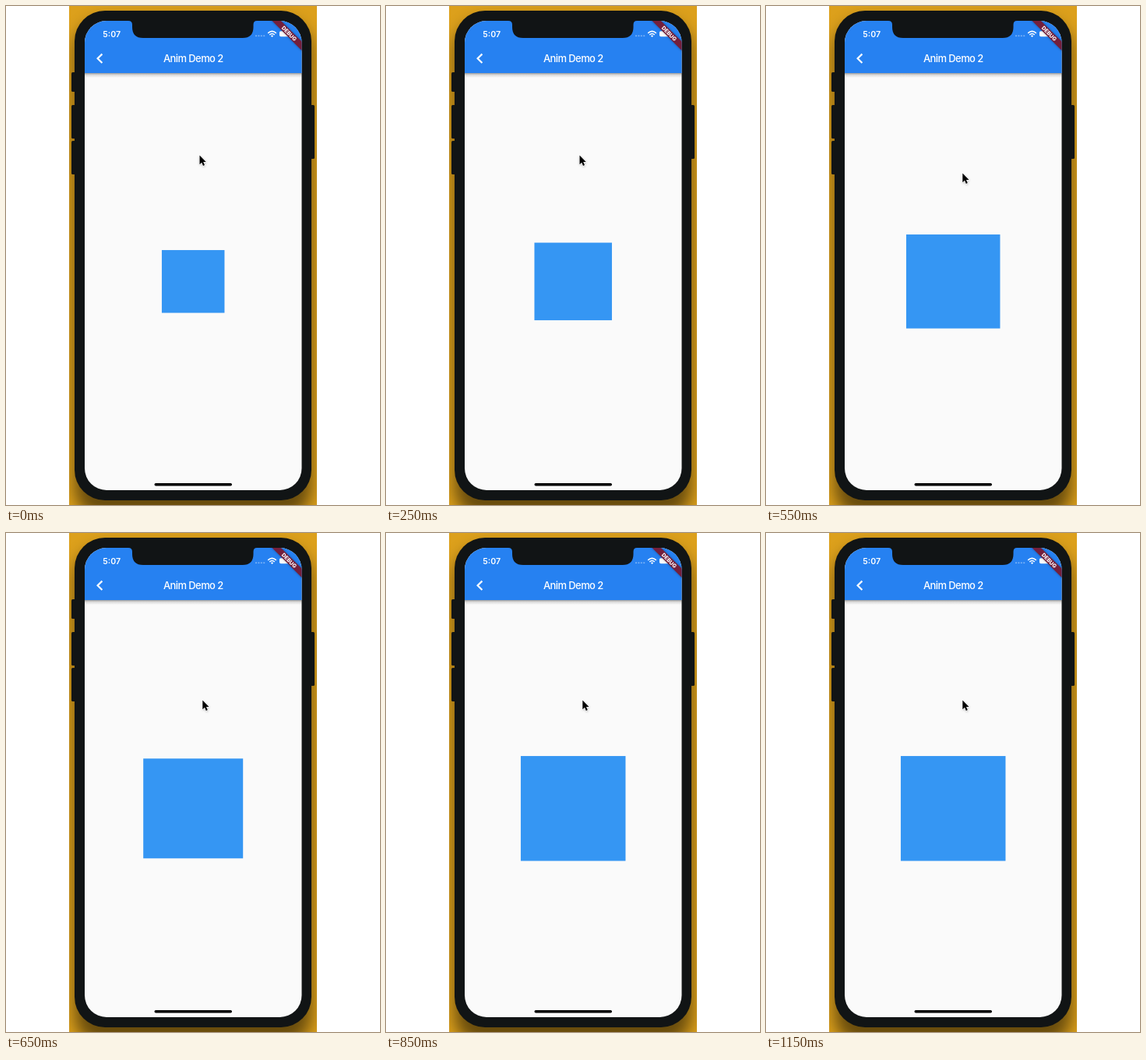
Animation, 480 px wide and 640 px high, one loop 1.2 s. Source, as an HTML page:

```html
<!DOCTYPE html>
<html lang="en">
<head>
<meta charset="utf-8">
<title>Anim Demo 2</title>
<style>
  html, body { margin: 0; width: 100%; height: 100%; overflow: hidden; background: #fff; }
  svg { display: block; width: 480px; height: 640px; }
  text { font-family: Inter, Roboto, sans-serif; fill: #fff; }
</style>
</head>
<body>
<svg viewBox="0 0 480 640">
  <defs>
    <clipPath id="desk"><rect x="81" width="318" height="640"/></clipPath>
    <clipPath id="screen"><rect x="101" y="19" width="278.5" height="602" rx="28"/></clipPath>
    <filter id="soft" x="-20%" y="-20%" width="140%" height="140%"><feGaussianBlur stdDeviation="10"/></filter>
    <filter id="glow" x="-50%" y="-50%" width="200%" height="200%"><feGaussianBlur stdDeviation="1.6"/></filter>
    <linearGradient id="barShadow" x2="0" y2="1">
      <stop offset="0" stop-color="#000" stop-opacity=".38"/>
      <stop offset=".4" stop-color="#000" stop-opacity=".13"/>
      <stop offset="1" stop-color="#000" stop-opacity="0"/>
    </linearGradient>
  </defs>

  <g clip-path="url(#desk)">
    <rect x="81" width="318" height="640" fill="#dca01c"/>
    <rect x="88" y="18" width="304" height="640" rx="40" opacity=".52" filter="url(#soft)"/>
  </g>

  <!-- phone body and side buttons -->
  <g fill="#111415">
    <rect x="84" y="85" width="8" height="25" rx="1.5"/>
    <rect x="84" y="127" width="8" height="43" rx="1.5"/>
    <rect x="84" y="173" width="8" height="43" rx="1.5"/>
    <rect x="388" y="127" width="8" height="69" rx="1.5"/>
    <rect x="88" y="6" width="304" height="628" rx="39"/>
  </g>

  <g clip-path="url(#screen)">
    <rect x="101" y="19" width="279" height="602" fill="#fafafa"/>
    <rect x="101" y="86" width="279" height="6" fill="url(#barShadow)"/>
    <rect x="101" y="19" width="279" height="67" fill="#2681f1"/>

    <text x="124.3" y="39.6" font-size="10.6" font-weight="600">5:07</text>
    <text x="202" y="72" font-size="13" font-weight="500" letter-spacing="-.6">Anim Demo 2</text>
    <path d="M123.4 61.6L117.6 67.3L123.4 73" fill="none" stroke="#fff" stroke-width="2.2"/>

    <g fill="#fff" opacity=".4">
      <rect x="320" y="37.5" width="2" height="1.6"/>
      <rect x="323.4" y="37.5" width="2" height="1.6"/>
      <rect x="326.8" y="37.5" width="2" height="1.6"/>
      <rect x="330.2" y="37.5" width="2" height="1.6"/>
    </g>
    <g fill="none" stroke="#fff" stroke-width="1.5">
      <path d="M336.2 34.9Q341.5 29.9 346.8 34.9"/>
      <path d="M338.2 37Q341.5 34 344.8 37"/>
    </g>
    <path d="M339.9 38.2Q341.5 36.9 343.1 38.2L341.5 40Z" fill="#fff"/>
    <rect x="351" y="32.3" width="15" height="7" rx="1.8" fill="#fff"/>

    <!-- corner ribbon -->
    <g transform="translate(379.5 19) rotate(45)">
      <rect x="-30" y="18.8" width="60" height="8" opacity=".4" filter="url(#glow)"/>
      <rect x="-30" y="18.8" width="60" height="8" fill="#741f3c"/>
      <text y="25.3" font-size="6.9" font-weight="800" text-anchor="middle">DEBUG</text>
    </g>

    <rect id="box" fill="#3596f3"/>
    <rect x="190.5" y="612" width="99.5" height="3.4" rx="1.7" fill="#000"/>
  </g>

  <path fill="#111415" d="M157 18H322V19Q317.500 19 317.500 24V27Q317.500 41 303.500 41H176Q162 41 162 27V24Q162 19 157 19Z"/>

  <g id="cursor">
    <path d="M0 1V13L3 10.500L5 15L7 14L5.200 9.700H9Z" opacity=".35" filter="url(#glow)"/>
    <path d="M0 0V11.800L2.700 9.300L4.500 13.500L6.500 12.600L4.700 8.600H8.300Z"
      stroke="#fff" stroke-width="1.4" paint-order="stroke" stroke-linejoin="round"/>
  </g>
</svg>
<script>
const LOOP = 1200, STEP = 50;
const box = document.getElementById('box');
const cursor = document.getElementById('cursor');

// Keys are [time, value] pairs.
const sizeKeys = [[0, 80.5], [250, 99.5], [400, 107], [550, 120.5], [650, 128], [740, 134.5]];
const xKeys = [[250, 248.5], [400, 250.3], [500, 252.3]];
const yKeys = [[250, 191.5], [400, 205.3], [500, 214.5]];

function at(keys, t) {
  if (t <= keys[0][0]) return keys[0][1];
  for (let i = 1; i < keys.length; i++) {
    const [t0, a] = keys[i - 1], [t1, b] = keys[i];
    if (t <= t1) return a + (b - a) * (t - t0) / (t1 - t0);
  }
  return keys[keys.length - 1][1];
}

function draw(ms) {
  const t = Math.floor((ms % LOOP) / STEP) * STEP;
  const size = at(sizeKeys, t);
  box.setAttribute('x', 240.2 - size / 2);
  box.setAttribute('y', 353.3 - size / 2);
  box.setAttribute('width', size);
  box.setAttribute('height', size);
  cursor.setAttribute('transform', `translate(${at(xKeys, t)} ${at(yKeys, t)})`);
}

const start = performance.now();
function tick() {
  draw(performance.now() - start);
  requestAnimationFrame(tick);
}
tick();
</script>
</body>
</html>
```
